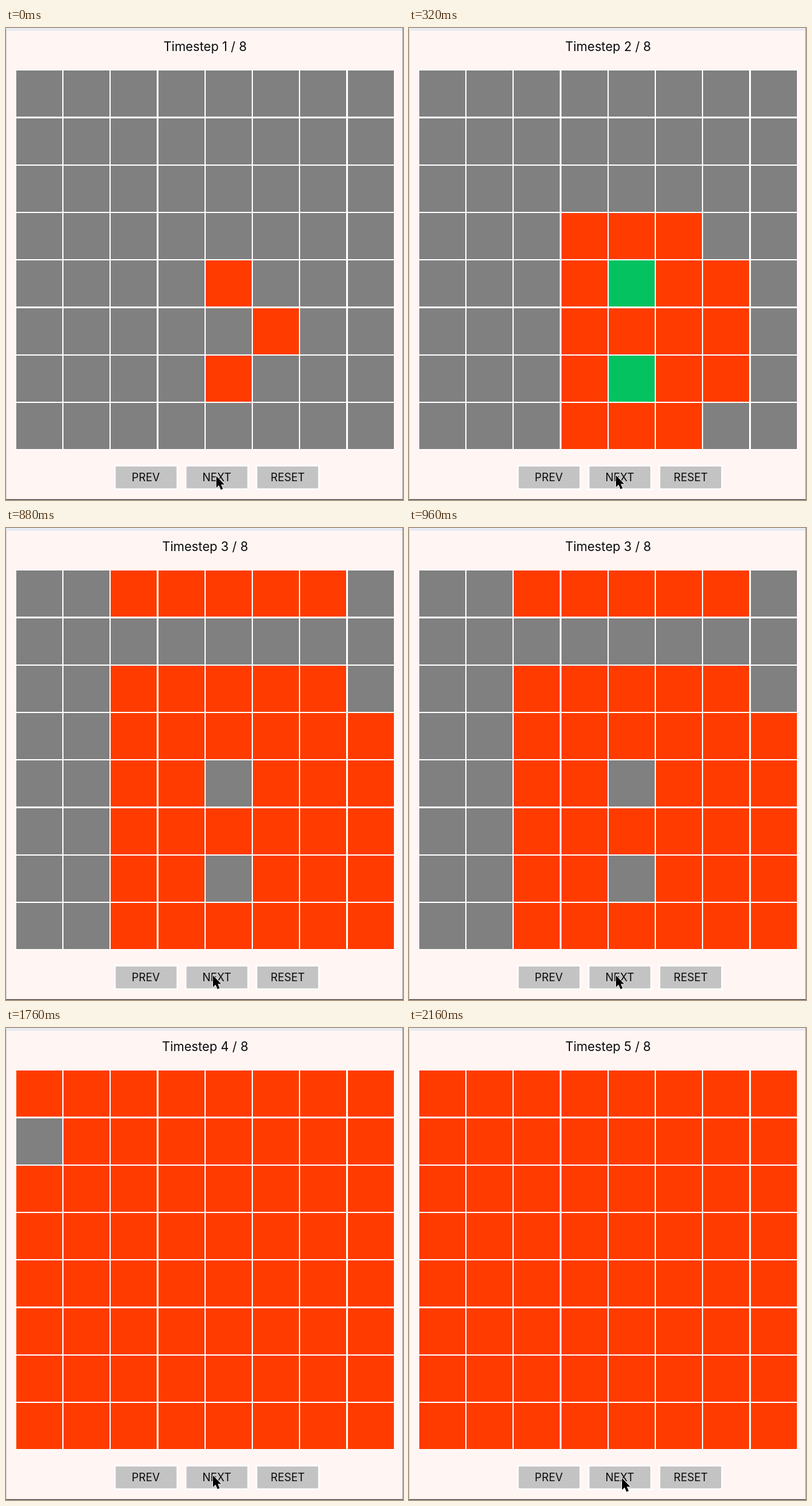
Write an HTML page that moves like this. It is 656 px wide and 778 px high and loops after 2.24 s.

```html
<!DOCTYPE html>
<html lang="en">
<head>
<meta charset="utf-8">
<title>Cell grid</title>
<style>
  html, body { margin: 0; width: 100%; height: 100%; overflow: hidden; background: #fff6f4; }
  svg { display: block; width: 656px; height: 778px; }
  text { font-family: Inter, "Liberation Sans", sans-serif; text-anchor: middle; fill: #0b0b0b; }
</style>
</head>
<body>
<svg id="stage" viewBox="0 0 656 778" xmlns="http://www.w3.org/2000/svg">
  <rect width="656" height="778" fill="#fff6f4"/>
  <rect width="656" height="3" fill="#e8ecf7"/>
  <rect y="3" width="656" height="1" fill="#dfe0e8"/>
  <rect y="4" width="1" height="774" fill="#d5cecd"/>
  <rect x="655" width="1" height="778" fill="#9a9696"/>
  <rect y="776" width="656" height="1" fill="#c9c3c2"/>
  <rect y="777" width="656" height="1" fill="#3c3a3a"/>
  <text id="title" x="329" y="38" font-size="20.8"></text>
  <rect x="16" y="69" width="626" height="626.5" fill="#fff"/>
  <g id="cells"></g>
  <g id="buttons" font-size="18"></g>
  <path id="cursor" d="M0 0V19.2L4.3 15.2L7.5 22.6L11 21.1L7.9 13.9H13.6Z"
    fill="#000" stroke="#fff" stroke-width="1.7" stroke-linejoin="round" paint-order="stroke"/>
</svg>
<script>
const LOOP = 2240, TICK = 80, N = 8, PITCH = 78.25;
const COLORS = { '.': '#808080', R: '#ff3b00', G: '#04c25f' };
const idle = '.'.repeat(N), full = 'R'.repeat(N);

const boards = [
  [idle, idle, idle, idle, '....R...', '.....R..', '....R...', idle],
  [idle, idle, idle, '...RRR..', '...RGRR.', '...RRRR.', '...RGRR.', '...RRR..'],
  ['..RRRRR.', idle, '..RRRRR.', '..RRRRRR', '..RR.RRR', '..RRRRRR', '..RR.RRR', '..RRRRRR'],
  [full, '.RRRRRRR', full, full, full, full, full, full],
  Array(N).fill(full)
].map(rows => rows.join(''));
const clicks = [240, 880, 1280, 1840];

const byId = id => document.getElementById(id);
const title = byId('title'), cursor = byId('cursor');

function add(parent, tag, attrs, label) {
  const el = document.createElementNS('http://www.w3.org/2000/svg', tag);
  for (const key in attrs) el.setAttribute(key, attrs[key]);
  if (label) el.textContent = label;
  return parent.appendChild(el);
}

const cells = Array.from({ length: N * N }, (_, i) => add(byId('cells'), 'rect', {
  x: Math.round(16.9 + PITCH * (i % N)),
  y: Math.round(70.3 + PITCH * Math.floor(i / N)),
  width: 76, height: 76
}));

['PREV', 'NEXT', 'RESET'].forEach((label, i) => {
  const x = 231 + 117.25 * i;
  add(byId('buttons'), 'rect', {
    x: Math.round(x - 51.5), y: 721.5, width: 103, height: 38.5,
    fill: '#c3c3c3', stroke: '#fff', 'stroke-width': 2.4
  });
  add(byId('buttons'), 'text', { x, y: 747 }, label);
});

function cursorAt(t) {
  if (t >= 2160) return [352, 742];
  const k = Math.min(t / 240, 1);
  return [347.5 - 5.5 * k, 738.5 - k];
}

let shown = -1;
function draw(time) {
  const t = Math.floor((time % LOOP) / TICK) * TICK;
  const step = clicks.filter(c => t >= c).length;
  if (step !== shown) {
    shown = step;
    title.textContent = `Timestep ${step + 1} / ${N}`;
    cells.forEach((cell, i) => cell.setAttribute('fill', COLORS[boards[step][i]]));
  }
  cursor.setAttribute('transform', `translate(${cursorAt(t)})`);
}

const start = performance.now();
function loop() {
  draw(performance.now() - start);
  requestAnimationFrame(loop);
}
loop();
</script>
</body>
</html>
```
